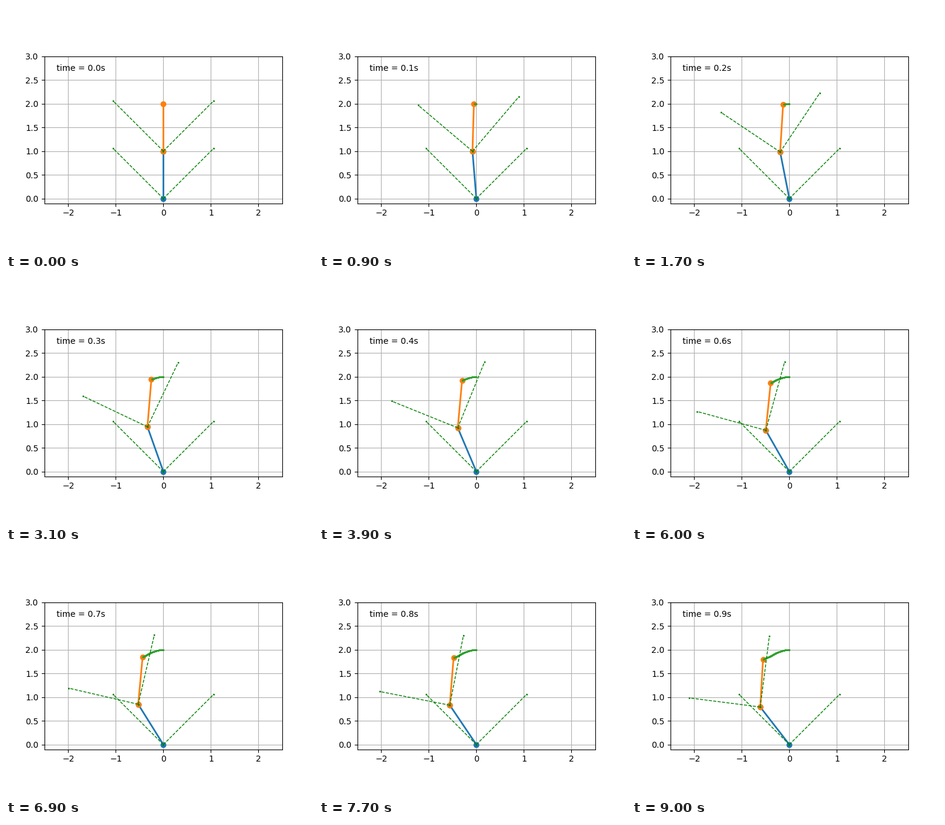
These frames come from a looping animation (510x408 px, 9.1 s). A matplotlib script:

```python
import numpy as np
import matplotlib.pyplot as plt
from matplotlib.animation import FuncAnimation

N = 91
DT = 0.01
LIMIT = np.pi / 4   # joint range on each side
REACH = 1.5         # length of the limit guides

t = np.arange(N) * DT


def integrate(times, rates):
    """Angle over time from piecewise linear angular velocity."""
    w = np.interp(t, times, rates)
    return np.concatenate([[0], np.cumsum((w[1:] + w[:-1]) / 2 * DT)])


# Angles from vertical, positive to the left
lower = integrate(
    [0, .07, .10, .15, .20, .30, .40, .50, .60, .70, .80, .90],
    [0, 1.48, 1.46, 1.40, 1.18, .83, .67, .54, .45, .43, .47, .56])
upper = -integrate(
    [0, .07, .17, .22, .31, .48, .54, .60, .70, .77, .90],
    [0, .55, .30, .12, .10, .10, .03, -.06, -.15, -.18, -.16])

elbow_x, elbow_y = -np.sin(lower), np.cos(lower)
hand_x, hand_y = elbow_x - np.sin(upper), elbow_y + np.cos(upper)

# The small margin keeps the pixel size from being rounded down
fig = plt.figure(figsize=(5.1001, 4.0801), dpi=100)
ax = fig.add_subplot(xlim=(-2.5, 2.5), ylim=(-0.1, 3))
ax.set_aspect('equal')
ax.set_xticks(range(-2, 3))
ax.set_yticks(np.arange(0, 3.1, 0.5))
ax.grid()

link1, = ax.plot([], [], 'o-', lw=2)
link2, = ax.plot([], [], 'o-', lw=2)
trace, = ax.plot([], [], '.-', lw=1, ms=2)
base_guides = [ax.plot([], [], 'g.--', lw=1, ms=2)[0] for _ in range(2)]
elbow_guides = [ax.plot([], [], 'g.--', lw=1, ms=2)[0] for _ in range(2)]
label = ax.text(0.05, 0.9, '', transform=ax.transAxes)


def set_guides(guides, x, y, angle):
    for line, side in zip(guides, (LIMIT, -LIMIT)):
        a = angle + side
        line.set_data([x, x - REACH * np.sin(a)], [y, y + REACH * np.cos(a)])


set_guides(base_guides, 0, 0, 0)


def draw(i):
    ex, ey = elbow_x[i], elbow_y[i]
    link1.set_data([0, ex], [0, ey])
    link2.set_data([ex, hand_x[i]], [ey, hand_y[i]])
    trace.set_data(hand_x[:i], hand_y[:i])
    set_guides(elbow_guides, ex, ey, lower[i])
    label.set_text(f'time = {i * DT:.1f}s')
    return [link1, link2, trace, *elbow_guides, label]


anim = FuncAnimation(fig, draw, frames=N, interval=100, repeat=True,
                     repeat_delay=0)
plt.show()
```
